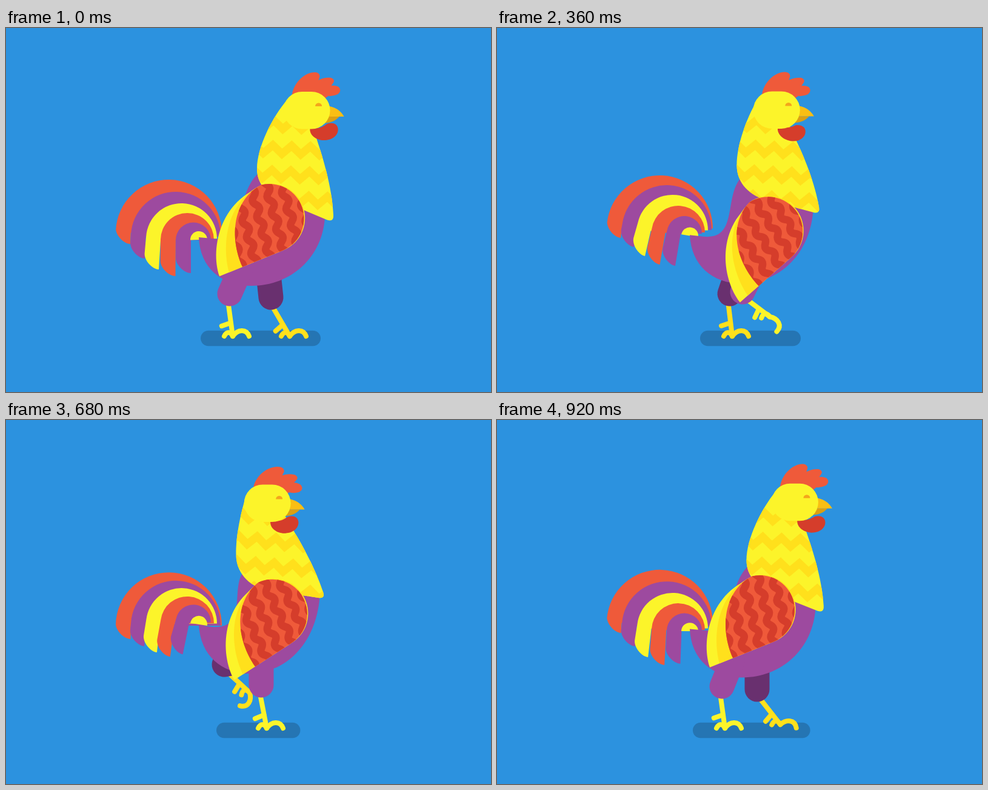
Write an HTML page with a canvas that moves like this. It is 800 px wide and 600 px high and loops after 960 ms.

```html
<!DOCTYPE html>
<html lang="en">
<head>
<meta charset="utf-8">
<title>Walking rooster</title>
<style>
html, body { margin: 0; width: 100%; height: 100%; overflow: hidden; background: #2c92df; }
canvas { display: block; width: 800px; height: 600px; }
</style>
</head>
<body>
<canvas id="stage" width="800" height="600"></canvas>
<script>
const ctx = document.getElementById('stage').getContext('2d');
const LOOP = 960, STEP = 40, RAD = Math.PI / 180;
const C = {
  sky: '#2c92df', shadow: '#2575b3', purple: '#9d4a9f', dark: '#69306f',
  orange: '#ef5a3a', red: '#d53d2b', yellow: '#fcf42a', amber: '#ffe01c',
  beak: '#f9be14', jaw: '#dc9f12', eye: '#f4a51c'
};

// Outlines leaning forward and leaning back
const BODY = [
  'M318 345C320 395 355 425 405 425C470 425 522 378 526 312L470 240L418 238C375 275 400 355 340 347Z',
  'M318 338C321 388 355 418 403 418C465 416 514 365 518 285L440 230L389 254C372 285 398 345 340 341Z'
];
const NECK = [
  'M464 118C440 146 414 196 414 232C414 258 432 276 455 285L530 316.5Q541 320 540 308C538 262 522 210 508 170L500 115Z',
  'M396 125C388 150 379 190 379.5 222C380 258 408 276 430 280L515 293Q526 295 523.5 285C514 255 495 215 468 172L436 115Z'
];

const COMB = 'M472 112C474 90 494 72 511 73Q518 74 518 80Q517 83 516 86Q526 81 536 82Q545 85 539 92L537 95Q543 94 549 97Q555 103 548 109Q540 113 532 112L524 118Z';
const WATTLE = 'M502 165C500 176 512 186 527 185C541 184 549 175 548 166C547 157 538 155 530 158C520 165 515 166 502 165Z';
const JAW = 'M520 146H550Q541 157 522 157Z';
const BEAK = 'M528 128Q549 130 558 146H520Z';

const WING = 'M-82 95C-98 48 -80 -38 2 -57A57 57 0 0 1 21 53Z';
const WING_MID = 'M-66 88.5C-78 45 -72 -28 -12 -56A57 57 0 0 1 21 53Z';
const WING_IN = 'M-44 79.6C-66 30 -60 -30 -14 -55.3A57 57 0 0 1 21 53Z';

// colour, left, right, then [mean, sin, cos] of top, tip x and tip y
const FEATHERS = [
  [C.orange, 181, 356, [249, 6, 1], [205, 1, 0], [356, 10, 0]],
  [C.purple, 206, 354, [265.5, 6.5, 4.5], [228, 2, 1], [373, 12, 7]],
  [C.yellow, 231, 348, [281, 6, 8], [249, 5, 3], [387, 11, 11]],
  [C.orange, 255, 343, [296.5, 3.5, 8.5], [273.5, 5, 6], [397, 7, 12]],
  [C.purple, 280, 338, [311.5, 1.5, 9], [297, 3, 8], [394, 2, 10]]
];

// time, knee x, knee y, hip x, foot x, foot y, toe angle
const GAIT = [
  [0, 369, 438, 387, 374, 508, 0],
  [120, 357, 412, 395, 370, 478, 61],
  [200, 360, 403, 395, 397, 455, 126],
  [360, 405, 435, 424, 450, 476, 65],
  [440, 429, 444, 429, 466, 503.5, 12],
  [480, 437, 444, 432, 468, 508, 0],
  [600, 428, 440, 430, 447, 508, 0],
  [680, 421, 437, 421, 430, 508, 0],
  [840, 384, 438, 398, 388, 508, 0],
  [920, 371, 439, 388, 376, 508, 0]
];

const fill = (path, color) => {
  ctx.fillStyle = color;
  ctx.fill(new Path2D(path));
};
const stroke = (path, color, width) => {
  ctx.strokeStyle = color;
  ctx.lineWidth = width;
  ctx.stroke(new Path2D(path));
};
const group = (x, y, deg, draw) => {
  ctx.save();
  ctx.translate(x, y);
  ctx.rotate(deg * RAD);
  draw();
  ctx.restore();
};
const around = (x, y, deg, draw) => group(x, y, deg, () => {
  ctx.translate(-x, -y);
  draw();
});

function blend([a, b], w) {
  const to = b.match(/-?[\d.]+/g);
  let i = 0;
  return a.replace(/-?[\d.]+/g, n => +n + (to[i++] - n) * w);
}

// Smooth periodic interpolation through the gait rows
function pose(t) {
  const n = GAIT.length;
  const row = i => GAIT[(i + n) % n];
  const time = i => row(i)[0] + LOOP * Math.floor(i / n);
  let i = n - 1;
  while (GAIT[i][0] > t) i--;
  const h = time(i + 1) - time(i), s = (t - time(i)) / h;
  return GAIT[0].slice(1).map((_, k) => {
    const v = j => row(j)[k + 1];
    const slope = j => (v(j + 1) - v(j - 1)) / (time(j + 1) - time(j - 1)) * h;
    const a = v(i), b = v(i + 1), d = b - a;
    const ma = slope(i), mb = slope(i + 1);
    return a + s * (ma + s * (3 * d - 2 * ma - mb + s * (ma + mb - 2 * d)));
  });
}

function leg(t, skin, thigh, far) {
  let [kx, ky, hx, fx, fy, toe] = pose(t);
  if (far) {
    const lift = Math.max(0, Math.sin(2 * Math.PI * t / LOOP));
    fx += 5 * lift;
    fy -= 6 * lift;
  }
  const ax = kx - 4, ay = ky + 4;
  const turn = Math.atan2(fy - ay, fx - ax) / RAD - 83;
  stroke(`M${ax} ${ay}L${fx} ${fy}`, skin, 8);
  group(fx, fy, turn, () => stroke('M-3 -22L-18 -17', skin, 8));
  group(fx, fy, toe, () => stroke('M0 0C8 -11 22 -13 27 0', skin, 8));
  group(fx, fy, -0.13 * toe, () => stroke('M0 0C-4 -8 -10 -8 -14 0', skin, 8));
  stroke(`M${kx} ${ky}L${hx} 397`, thigh, 41);
}

function feather([color, left, right, top, tipX, tipY], wave) {
  const r = (right - left) / 2, cx = left + r, cy = wave(top) + r;
  const tx = wave(tipX), ty = wave(tipY), w = 25, k = 0.45 * w;
  const a = 0.8 * (left + w - tx) / (ty - cy);
  const s = Math.sin(a), c = Math.cos(a);
  // Point given along and across the feather, seen from its tip
  const at = (x, y) => `${tx + x * c - y * s} ${ty + x * s + y * c}`;
  fill(`M${right} ${cy}A${r} ${r} 0 0 0 ${cx - r * c} ${cy - r * s}L${at(-w, -w)}` +
    `C${at(-w, k - w)} ${at(-k, 0)} ${at(0, 0)}L${at(0, cy - ty)}Z`, color);
}

function tail(u, v) {
  const wave = ([m, sn, cs]) => m + sn * v + cs * u;
  FEATHERS.forEach(f => feather(f, wave));
  group(318, 342.5 + 6.5 * u, 5 - 4 * v - 7 * u, () => fill('M-14 0A14 14 0 0 1 14 0Z', C.yellow));
}

function neck(u, w) {
  const shape = new Path2D(blend(NECK, w));
  ctx.fillStyle = C.yellow;
  ctx.fill(shape);
  ctx.save();
  ctx.clip(shape);
  ctx.lineJoin = 'miter';
  ctx.translate(457 + 14 * u, 198);
  ctx.rotate((3 - u) * RAD);
  for (let y = -38; y < 120; y += 41) {
    let zig = `M-124 ${y - 7}`;
    for (let i = 0; i < 8; i++) zig += 'l15.5 14l15.5 -14';
    stroke(zig, C.amber, 13);
  }
  ctx.restore();
}

function head(u, v) {
  group(-35.2 + 34.8 * u, -0.6 - u + 1.6 * u * u, 0, () => {
    around(515, 150, 3 - 9 * v - 3 * u, () => fill(WATTLE, C.red));
    around(495, 120, 4 + 3 * v - 4 * u, () => fill(COMB, C.orange));
    fill(JAW, C.jaw);
    fill(BEAK, C.beak);
    ctx.fillStyle = C.yellow;
    ctx.beginPath();
    ctx.roundRect(458, 105, 77, 61.5, 30.7);
    ctx.fill();
    fill('M510.5 129A5.5 5.5 0 0 1 521.5 129Z', C.eye);
  });
}

function wing(t) {
  const p = 2 * Math.PI * t / LOOP;
  const c = Math.cos(p), s = Math.sin(p), c2 = Math.cos(2 * p);
  const x = 440.5 - 6.4 * c + 2.8 * s;
  const y = 323.6 - 12.7 * c + 4.2 * s + 3.3 * c2;
  group(x, y, -10.4 + 9.5 * c - 3 * s + 0.9 * c2, () => {
    fill(WING, C.yellow);
    fill(WING_MID, C.amber);
    fill(WING_IN, C.orange);
    ctx.clip(new Path2D(WING_IN));
    ctx.rotate(-15 * RAD);
    for (let i = -4; i < 4; i++) {
      let wavy = `M${i * 25 + 10} -112`;
      for (let j = 0; j < 8; j++) wavy += 'q8 7 0 14q-8 7 0 14';
      stroke(wavy, C.red, 12.5);
    }
  });
}

function draw(t) {
  const th = 4 * Math.PI * t / LOOP;
  const u = Math.cos(th), v = Math.sin(th), w = (1 - u) / 1.866;
  ctx.fillStyle = C.sky;
  ctx.fillRect(0, 0, 800, 600);
  ctx.lineCap = ctx.lineJoin = 'round';

  const x0 = 335 - 13.9 * u, x1 = 501 + 18 * u;
  stroke(`M${x0 + 12.8} 511.5H${x1 - 12.8}`, C.shadow, 25.6);
  tail(u, v);
  leg((t + LOOP / 2) % LOOP, C.amber, C.dark, true);
  fill(blend(BODY, w), C.purple);
  leg(t, C.yellow, C.purple, false);
  neck(u, w);
  head(u, v);
  wing(t);
}

function tick() {
  draw(Math.floor(performance.now() % LOOP / STEP) * STEP);
  requestAnimationFrame(tick);
}
tick();
</script>
</body>
</html>
```
